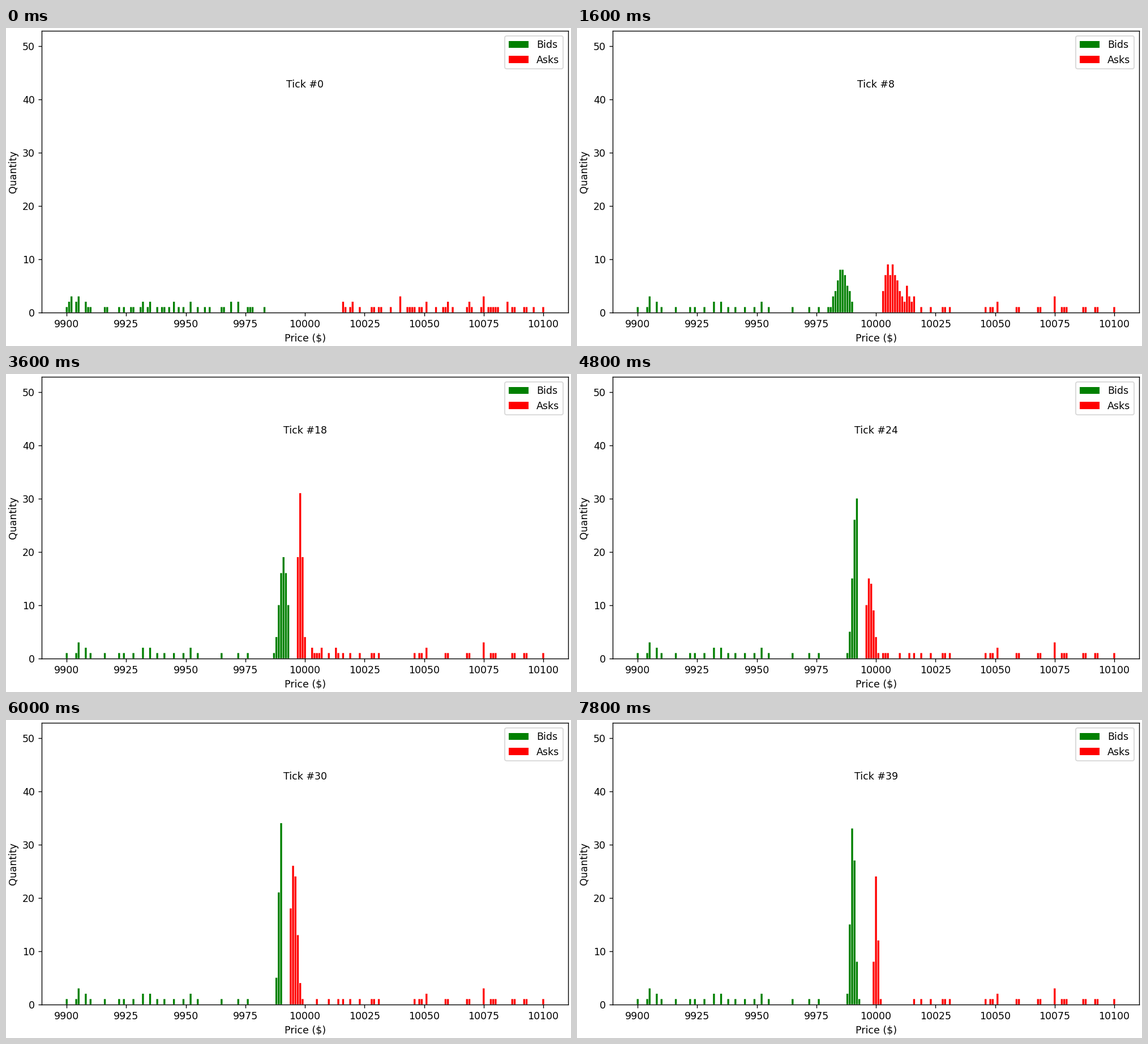
These frames come from a looping animation (998 by 561 pixels, 8 s). A matplotlib script:

```python
import numpy as np
import matplotlib.pyplot as plt
from matplotlib.animation import FuncAnimation

W, H, DPI = 998, 561, 125
TICKS, STEP = 40, 200
MID = 10000
DIST = np.arange(-100, 101)
FOREVER = TICKS

# The crowd near the spread; prices are relative to MID.
KEY_TICKS = [0, 8, 12, 18, 24, 30, 39]
BID_PATH = dict(
    best=[-17, -10, -7, -7, -8, -10, -7],
    centre=[-20, -14.2, -9, -9, -8.2, -10, -9.7],
    peak=[0, 8, 25, 19, 30, 34, 35],
    width=[3, 2.5, 0.7, 1.7, 1.5, 1, 1],
)
ASK_PATH = dict(
    best=[16, 3, -4, -3, -4, -6, -2],
    centre=[18, 7, -0.7, -2, -2.6, -4.7, 0.1],
    peak=[0, 7, 13, 31, 15, 27, 24],
    width=[3, 3, 1.6, 1, 1.6, 1.4, 0.75],
)


def scatter(rng, nearest, keep):
    """Fifty resting orders; those not kept are cancelled within 7 ticks."""
    dist = rng.integers(nearest, 101, 50)
    dist[0], dist[-1] = 100, nearest
    life = np.where(rng.random(50) < keep, FOREVER, rng.integers(1, 8, 50))
    life[0], life[-1] = FOREVER, 5
    return dist, np.zeros(50), life


def stragglers(rng, n=30):
    """Asks left behind as the market falls, fading out one by one."""
    return (rng.integers(2, 18, n), rng.integers(5, 12, n),
            12 + rng.exponential(5, n))


def count(orders, tick):
    dist, birth, life = orders
    live = (birth <= tick) & (tick < life)
    return np.bincount(dist[live] + 100, minlength=len(DIST))


def crowd(path, sign, tick):
    best, centre, peak, width = (
        np.interp(tick, KEY_TICKS, path[k])
        for k in ("best", "centre", "peak", "width"))
    size = np.rint(peak * np.exp(-((DIST - centre) / width) ** 2 / 2))
    return size * (sign * DIST >= sign * np.rint(best))


rng = np.random.default_rng(4)
bid_rest = scatter(rng, 17, 0.52)
ask_rest = scatter(rng, 16, 0.66)
ask_late = stragglers(rng)


def bids(tick):
    return count(bid_rest, tick)[::-1] + crowd(BID_PATH, -1, tick)


def asks(tick):
    return (count(ask_rest, tick) + count(ask_late, tick)
            + crowd(ASK_PATH, 1, tick))


fig = plt.figure(figsize=((W + 1e-6) / DPI, (H + 1e-6) / DPI), dpi=DPI)
left, right, top, bottom = 63.3, 992.9, 5.2, 501.7
ax = fig.add_axes([left / W, 1 - bottom / H,
                   (right - left) / W, (bottom - top) / H])

sides = [(ax.bar(MID + DIST, book(0), color=color, label=label, snap=False),
          book)
         for book, color, label in ((bids, "green", "Bids"),
                                    (asks, "red", "Asks"))]
ax.set_xlim(MID - 110.44, MID + 110.44)
ax.set_ylim(0, 52.8)
ax.set_xticks(range(9900, 10101, 25))
ax.set_yticks(range(0, 51, 10))
ax.set_xlabel("Price ($)")
ax.set_ylabel("Quantity")
ax.legend(loc="upper right")
title = ax.text(0.5, 0.8, "Tick #0", ha="center", transform=ax.transAxes)


def draw(tick):
    for bars, book in sides:
        for bar, size in zip(bars, book(tick)):
            bar.set_height(size)
    title.set_text(f"Tick #{tick}")
    return [title]


anim = FuncAnimation(fig, draw, frames=TICKS, interval=STEP,
                     init_func=lambda: draw(0), repeat=True, repeat_delay=0)
plt.show()
```
